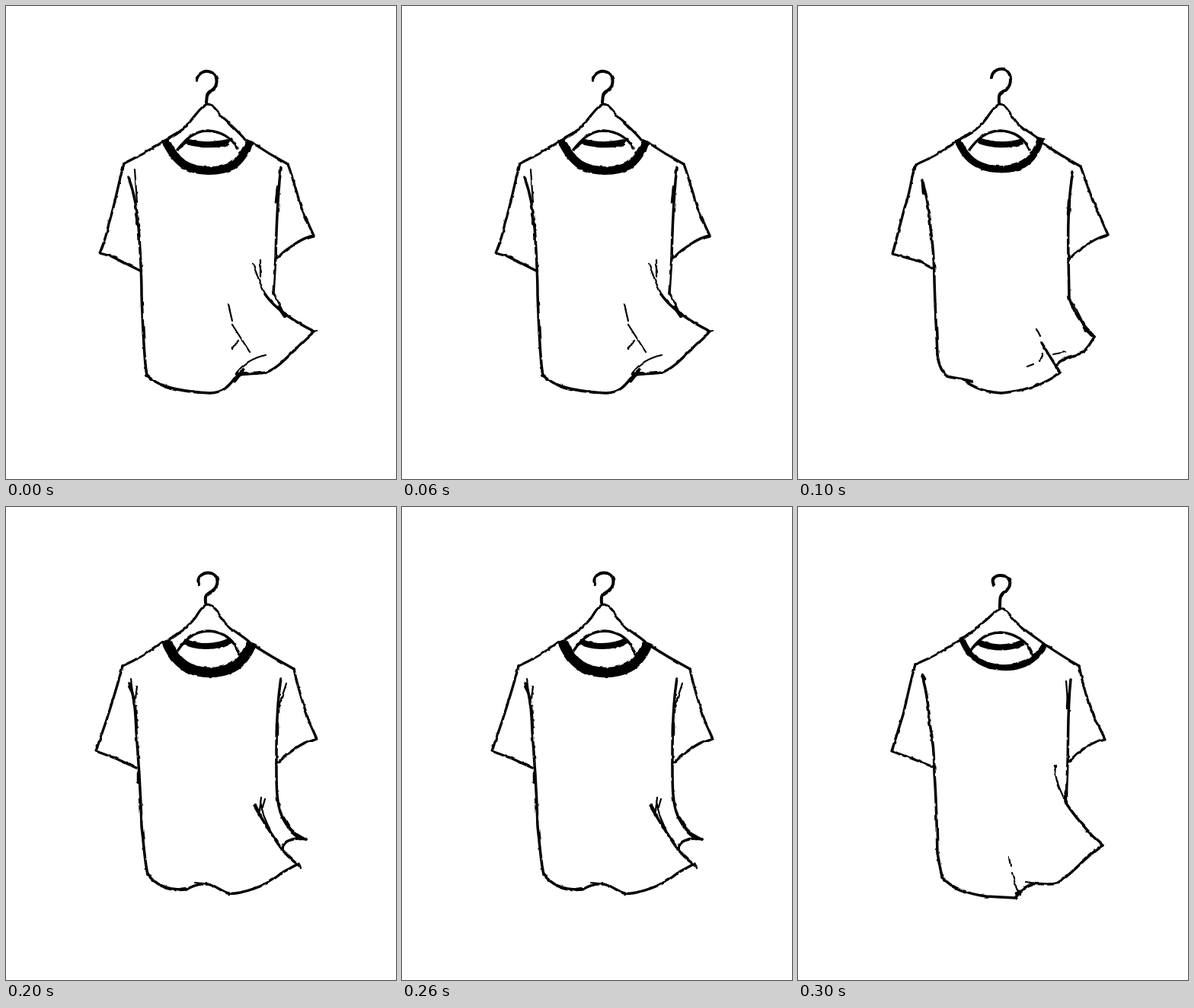
Recreate the animation shown at these times as an HTML page. Size 512 by 622 pixels, loop 400 ms.

```html
<!DOCTYPE html>
<html lang="en">
<head>
<meta charset="utf-8">
<title>Shirt in the wind</title>
<style>
  html, body { margin: 0; width: 100%; height: 100%; overflow: hidden; background: #fff; }
  svg { display: block; width: 100%; height: 100%; }
  path { fill: none; stroke: #000; stroke-linecap: round; stroke-linejoin: round; }
  .band, .back { stroke-linecap: butt; }
</style>
</head>
<body>
<svg viewBox="0 0 512 622">
  <!-- Slightly uneven ink edges -->
  <filter id="ink" filterUnits="userSpaceOnUse" x="0" y="0" width="512" height="622" color-interpolation-filters="sRGB">
    <feTurbulence type="fractalNoise" baseFrequency="0.09" numOctaves="2" seed="4"/>
    <feDisplacementMap in="SourceGraphic" scale="3" xChannelSelector="R" yChannelSelector="G"/>
  </filter>
  <g id="shirt" filter="url(#ink)"></g>
</svg>
<script>
const STEP = 100;
const WEIGHTS = {
  hook: 4, hanger: 3.2, neck: 3.4, back: 8, band: 10, shoulders: 3.3,
  sleeves: 3.3, sides: 3.5, hem: 3.5, folds: 2.2, accents: 4.5
};

// Each pose is one hand-drawn state of the shirt.
const poses = [
  {
    bandWeight: 11,
    hook: 'M250 98C252 87 263 83 271 88C279 94 278 106 270 111C263 114 264 118 263 127',
    hanger: 'M214 173C228 166 239 157 248 144Q260 129 265 129C273 129 280 144 289 150C298 160 307 167 314 176',
    neck: 'M225 189C237 174 248 164 265 164C284 165 297 175 304 187M226 188L238 179M291 178L296 175',
    back: 'M236 178Q264 186 292 179',
    band: 'M208 175C216 190 222 200 233 208C251 219 280 219 297 210C308 203 315 191 321 177',
    shoulders: 'M204 180Q180 195 155 207M322 179Q346 195 370 208',
    sleeves: 'M155 207C147 235 143 261 135 286C132 303 127 315 123 325L138 329L176 348M370 208C378 229 383 252 389 269L404 302C390 304 370 318 356 331',
    sides: 'M161 226C168 245 172 265 174 290C176 320 178 345 178 380C180 430 181 465 185 486M361 212C357 245 355 290 354 330L351 378',
    hem: 'M185 486C200 500 225 507 268 509C286 508 292 500 300 490C308 481 321 485 341 482C362 475 380 448 405 428M340 379C352 396 372 412 405 428',
    folds: 'M324 338C330 355 335 371 342 381M334 334L334 356M333 340L335 350M292 393L297 414M297 419L320 455M297 451L305 440M341 459C323 463 312 470 303 482M169 215L171 244L172 258M352 378L364 403M405 428L408 427',
    accents: 'M171 274L174 289M357 238L355 258M358 396L366 408M312 478L300 493M303 484L318 483'
  },
  {
    bandWeight: 9.5,
    hook: 'M254 95C255 84 265 81 273 84C281 90 281 104 273 110C265 115 263 114 264 127',
    hanger: 'M214 174C226 167 238 162 248 147Q260 129 265 129C273 129 280 145 288 154C297 163 307 167 316 175',
    neck: 'M225 189C236 174 248 164 266 164C284 165 297 174 304 189',
    back: 'M237 177Q266 187 295 178',
    band: 'M209 175C216 190 222 200 234 207C251 217 280 217 296 208C308 201 315 188 319 173',
    shoulders: 'M207 179Q182 197 156 208M320 180Q346 197 371 211',
    sleeves: 'M156 208C149 215 150 238 140 265L124 326L160 336L178 346M371 211C378 230 384 250 391 264L407 301C391 304 372 318 356 332',
    sides: 'M163 230C169 249 173 267 174 292C177 314 179 338 179 360C180 400 182 430 183 458M361 218C355 250 354 290 355 330L356 384Q361 400 373 417L389 435',
    hem: 'M183 458C185 474 189 482 196 487C207 490 216 490 229 494M216 491C232 503 247 508 267 509C295 506 325 498 344 482M320 443C329 459 337 470 344 482M339 472C352 459 365 461 375 455Q383 446 389 435',
    folds: 'M313 424L318 434M321 457L317 467M301 474L309 471M335 458L351 455M362 392L378 424',
    accents: 'M164 233L165 246M356 256L355 274M376 423L386 433'
  },
  {
    bandWeight: 13.5,
    hook: 'M253 101C250 91 260 85 269 87C280 91 280 103 271 110C263 116 261 114 262 126',
    hanger: 'M214 174C226 166 240 157 249 145Q259 128 265 128C275 130 281 143 288 153C296 162 309 168 319 177',
    neck: 'M226 188C236 173 248 163 266 163C286 164 300 175 306 193M230 181L239 176',
    back: 'M233 177Q266 190 296 175',
    band: 'M210 175C216 191 223 201 235 209C253 220 279 220 297 211C310 204 318 191 323 178',
    shoulders: 'M205 178Q180 197 153 209M325 182Q350 198 378 213',
    sleeves: 'M153 209C147 233 139 258 132 280L118 321L145 331L171 343M378 213C383 238 391 261 397 280L408 305C390 307 370 324 356 337',
    sides: 'M162 232C169 250 170 270 171 295C174 335 177 380 178 420C181 445 182 465 186 483M361 226C357 250 355 285 355 325C355 360 354 388 362 406C369 422 380 431 393 437',
    hem: 'M186 483C196 497 214 504 237 503C249 496 260 493 272 498C283 503 288 510 301 508C326 504 347 494 362 481L384 469M326 393C336 410 346 427 360 447C367 457 375 464 385 472M393 437C378 434 364 438 363 450',
    folds: 'M334 387L338 405L347 426M335 382L333 400M340 384L336 398M327 391L333 403M164 226L168 262M172 236L169 260M161 236L168 250M368 232L358 263M384 469L387 475M248 494L267 496',
    accents: 'M170 262L172 289M174 350L174 362M356 285L356 299M364 409L371 421M376 428L386 436M229 503L237 502'
  },
  {
    bandWeight: 8,
    hook: 'M257 102C252 92 263 88 271 91C281 95 280 105 272 111C265 115 265 119 265 133',
    hanger: 'M214 174C227 165 239 155 250 146Q262 134 267 134C276 136 280 146 289 154C300 164 311 171 323 180',
    neck: 'M228 187C238 173 249 165 266 165C284 166 302 176 308 194M230 184L242 178',
    back: 'M236 178Q266 191 296 178',
    band: 'M214 171C220 186 225 194 237 202C254 213 280 214 298 206C311 200 319 191 325 180',
    shoulders: 'M214 174Q187 193 154 207M326 182Q350 198 369 209',
    sleeves: 'M154 207C147 231 143 253 138 273L123 321L150 331L178 342M369 209C374 234 380 257 389 276L403 305C389 308 371 318 356 335',
    sides: 'M163 221C169 244 172 264 173 285C177 305 179 325 179 350C182 390 182 420 183 455L189 487M358 228C354 260 355 300 354 335L352 389',
    hem: 'M189 487C202 501 220 508 247 512L285 514C291 508 293 502 304 497C315 493 327 498 339 495C357 487 377 459 400 445M351 388C363 407 378 423 386 432L400 445',
    folds: 'M338 340C336 356 344 372 352 389M339 340L338 350M277 461L279 472M281 481L287 502L292 509M299 493L313 495M352 229L355 266M166 234L169 245',
    accents: 'M163 221L166 226M355 247L354 264M352 374L352 388M287 509L290 506'
  }
];

const shirt = document.getElementById('shirt');
const strokes = Object.entries(WEIGHTS).map(([name, weight]) => {
  const path = document.createElementNS('http://www.w3.org/2000/svg', 'path');
  path.setAttribute('class', name);
  path.setAttribute('stroke-width', weight);
  shirt.append(path);
  return { name, path };
});
const band = shirt.querySelector('.band');

function showPose(pose) {
  for (const { name, path } of strokes) path.setAttribute('d', pose[name]);
  band.setAttribute('stroke-width', pose.bandWeight);
}

let shown;
function draw() {
  const pose = poses[Math.floor(performance.now() / STEP) % poses.length];
  if (pose !== shown) showPose(shown = pose);
  requestAnimationFrame(draw);
}
draw();
</script>
</body>
</html>
```
